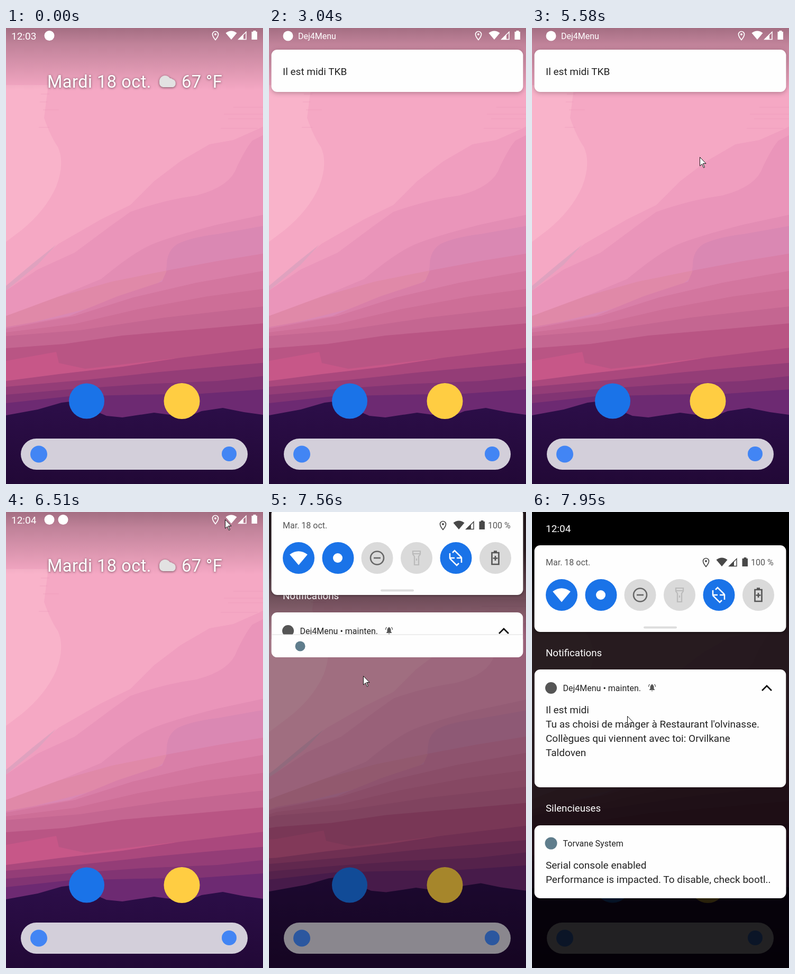
An HTML page that plays this animation: 486x863 px, repeating every 8000 ms.

```html
<!DOCTYPE html>
<html lang="fr">
<head>
<meta charset="utf-8">
<title>Notification de midi</title>
<style>
html, body { margin: 0; height: 100%; overflow: hidden; background: #000; }
svg { display: block; font: 19px Roboto, sans-serif; }
#date { font-size: 32.5px; letter-spacing: .5px; fill: #fff; filter: drop-shadow(0 1px 2px #0008); }
#headsUp { filter: drop-shadow(0 2px 5px #0004); }
.small { font-size: 16px; }
.section { font-size: 18.7px; }
</style>
</head>
<body>
<svg id="stage" width="486" height="863" viewBox="0 0 486 863">
<defs>
  <linearGradient id="scrim" x2="0" y2="1">
    <stop stop-color="#201018" stop-opacity=".38"/>
    <stop offset=".25" stop-color="#201018" stop-opacity=".25"/>
    <stop offset="1" stop-color="#201018" stop-opacity="0"/>
  </linearGradient>
  <linearGradient id="night" x2="0" y2="1">
    <stop stop-color="#2c0e49"/><stop offset=".75" stop-color="#210835"/>
  </linearGradient>
  <linearGradient id="header" x2="0" y2="1">
    <stop offset=".3"/><stop offset="1" stop-opacity="0"/>
  </linearGradient>
  <path id="wifi" d="M0 16-10.5 3.5Q0-4.5 10.5 3.5Z"/>
  <g id="system" fill="currentColor">
    <path d="M396 22.5C394 20 390.5 16 390.5 12a5.5 5.5 0 0 1 11 0C401.500 16 398 20 396 22.500Z" fill="none" stroke="currentColor" stroke-width="1.700"/>
    <circle cx="396" cy="12" r="2"/>
    <use href="#wifi" x="426" y="6"/>
    <path d="M454 7.500V21.500H440Z" fill="none" stroke="currentColor" stroke-width="1.500"/>
    <path d="M449 11.500V22H438.500Z"/>
    <path d="M464.500 7h3V5h5v2h2.500v15h-10.500z"/>
  </g>
</defs>

<g id="wallpaper">
  <path fill="#f5a8c4" d="M-40-40H530V930H-40Z"/>
  <path fill="#f9b3ca" d="M-40 108H80L72 170Q84 205 98 225Q112 255 95 300Q75 345 30 382L-40 435Z"/>
  <path fill="#f09ebf" d="M-40 520 0 490 50 448 100 408 180 362 235 335 280 290 330 252 385 220 430 212 475 192 530 165V930H-40Z"/>
  <path fill="#dfa2bf" d="M-40 518 0 488 50 446 95 410 60 448 0 497-40 525Z"/>
  <path fill="#ea95ba" d="M-40 522 0 497 60 457 130 425 200 373 235 348Q300 325 360 317Q425 300 437 262Q455 225 466 213L530 180V930H-40Z"/>
  <path fill="#e38db4" d="M-40 560 0 545 60 525 120 500 180 475Q240 425 275 410T400 372L530 344V930H-40Z"/>
  <path fill="#da88b3" d="M-40 570 120 536 210 508Q260 495 285 484Q304 474 304 445Q306 420 324 409Q350 396 400 390L530 367V930H-40Z"/>
  <path fill="#e089a8" d="M-40 562 0 545 100 508 200 480 304 459Q303 474 285 484Q250 500 150 532L-40 580Z"/>
  <path fill="#d97fa8" d="M-40 582 0 566 120 545 210 508 295 480 304 459 400 441 530 420V930H-40Z"/>
  <path fill="#d3769f" d="M-40 580 0 569 130 545 240 510 360 482 530 452V930H-40Z"/>
  <path fill="#cd6e97" d="M-40 588 0 576 130 560 250 532 380 508 530 488V930H-40Z"/>
  <path fill="#c46691" d="M-40 592 0 583 140 572 300 548 530 522V930H-40Z"/>
  <path fill="#b95584" d="M-40 612 0 606 110 598 220 582 350 571 530 555V930H-40Z"/>
  <path fill="#c75788" d="M-40 634 0 630 95 613 100 634 150 645 320 625 290 638 150 655-40 675Z"/>
  <path fill="#aa487d" d="M-40 670 0 668 100 655 220 641 330 624 530 600V930H-40Z"/>
  <path fill="#943d77" d="M-40 682 0 679 150 666 290 651 400 641 530 630V930H-40Z"/>
  <path fill="#823473" d="M-40 698 0 694 130 683 260 674 400 668 530 654V930H-40Z"/>
  <path fill="#6d2a72" d="M-40 714 0 710 120 697 250 694 370 692 530 681V930H-40Z"/>
  <path fill="url(#night)" d="M-40 740 0 733 60 722 105 709 130 706 160 721 190 734 220 737 280 728 310 732 340 737 370 725 410 719 450 727 530 738V930H-40Z"/>
  <path stroke="#e895b7" opacity=".5" d="M430 150h80M412 163h90M420 172h70M406 190h70M62 188h20M66 125h16M70 155h30M64 140h14"/>
</g>
<path fill="url(#scrim)" d="M0 0H486V118H0Z"/>

<circle cx="152.500" cy="706" r="33.500" fill="#1a73e8"/>
<circle cx="332.500" cy="706" r="34" fill="#ffcd42"/>
<rect x="28" y="777" width="429" height="59" rx="29.500" fill="#d3cfda"/>
<circle cx="62" cy="806.500" r="16" fill="#4285f4"/>
<circle cx="422" cy="806" r="14" fill="#4285f4"/>

<g id="date">
  <text x="78" y="113">Mardi 18 oct.</text>
  <path fill="#e2e2e2" d="M297 112a8 8 0 0 1-7-9A11 11 0 0 1 310 95a7 7 0 0 1 5 2a8 8 0 0 1 1 15Z"/>
  <text x="332" y="113">67 °F</text>
</g>

<g id="status" fill="#fff" color="#fff">
  <g id="clock">
    <text id="time" x="10" y="21.500">12:03</text>
    <circle cx="82" cy="14.500" r="9.500"/>
    <circle id="extra" cx="108" cy="14.500" r="9.500"/>
  </g>
  <g id="app"><circle cx="36" cy="15" r="9.500"/><text class="small" x="55" y="20.500">Dej4Menu</text></g>
  <use href="#system"/>
</g>

<g id="headsUp">
  <rect x="4.500" y="41" width="476" height="80" rx="11" fill="#fefefe"/>
  <text x="26" y="89" fill="#222">Il est midi TKB</text>
</g>

<rect id="dim" width="486" height="863"/>
<g id="shade">
  <path id="top" fill="url(#header)" d="M0 0H486V235H0Z"/>
  <text id="label" class="section" x="26" fill="#fff">Notifications</text>
  <svg id="card" x="4.500" width="476" height="223">
    <rect width="476" height="100%" rx="11" fill="#fefefe"/>
    <g transform="translate(-4.500 -298)" fill="#222">
      <circle cx="36" cy="333" r="11" fill="#555"/>
      <text class="small" x="58.500" y="338.500">Dej4Menu • mainten.</text>
      <path fill="#555" d="M222 337v-1l1.500-1.500V331q0-3 2.500-4v-1h2v1q2.500 1 2.500 4v3.500L232 336v1ZM225.500 338h3q-1.500 2.500-3 0Z"/>
      <path d="M220.500 331q0-3 2-5M233.500 331q0-3-2-5" fill="none" stroke="#555" stroke-width="1.300"/>
      <path d="M435 338 444 329 453 338" fill="none" stroke="#111" stroke-width="2.800"/>
      <text x="26" y="381">Il est midi</text>
      <text x="26" y="407.500">Tu as choisi de manger à Restaurant l'olvinasse.</text>
      <text x="26" y="434.500">Collègues qui viennent avec toi: Orvilkane</text>
      <text x="26" y="461.500">Taldoven</text>
    </g>
    <g id="shelf">
      <rect width="476" height="43" rx="11" fill="#fefefe"/>
      <path d="M0 0H476" stroke="#ddd"/>
      <circle id="shelfApp" cx="58.500" cy="22" r="9.500" fill="#555"/>
      <circle id="shelfSystem" cy="22" r="9.500" fill="#5f7d8c"/>
    </g>
  </svg>

  <g id="silent" fill="#222">
    <text class="section" x="26" y="567" fill="#fff">Silencieuses</text>
    <rect x="4.500" y="593" width="476" height="138" rx="11" fill="#fefefe"/>
    <circle cx="36" cy="627" r="11.500" fill="#5f7d8c"/>
    <text class="small" x="58.500" y="632.500">Torvane System</text>
    <text x="26" y="675">Serial console enabled</text>
    <text x="26" y="701.500">Performance is impacted. To disable, check bootl..</text>
  </g>

  <g id="panel">
    <text x="26" y="38" fill="#fff">12:04</text>
    <rect x="4.500" y="63" width="476" height="164" rx="11" fill="#fefefe" style="filter:drop-shadow(0 1px 2px #0006)"/>
    <g class="small" fill="#555"><text x="26" y="101">Mar. 18 oct.</text><text x="414" y="101">100 %</text></g>
    <use href="#system" x="-67" y="81" color="#484848"/>
    <g id="toggles"></g>
    <use href="#wifi" transform="translate(56 145) scale(1.600)" fill="#fff"/>
    <circle cx="130" cy="157" r="9" fill="#fff"/>
    <g fill="none" stroke="#666" stroke-width="2.600">
      <circle cx="204.500" cy="157" r="12.500"/><path d="M198 157h13"/>
      <path stroke="#bbb" stroke-width="2.200" d="M272 144h14v6l-3 4v16h-8v-16l-3-4ZM272 149h14M279 158v4"/>
      <path stroke="#fff" stroke-width="2.500" d="M347 147l4-4 13 13M359 167l-4 4-13-13M342 148v9h9M364 166v-9h-9"/>
      <path stroke="#555" d="M421.500 147h13v22h-13ZM428 153v9M423.500 157.500h9M425 144.500h6"/>
    </g>
    <rect x="211" y="216.500" width="63" height="4" rx="2" fill="#ddd"/>
  </g>
</g>
<path id="cursor" fill="#fff" stroke="#111" d="M.5.5V17L4.500 13.500 7.500 20.500 9.500 19.500 6.500 12.500H12Z"/>
</svg>

<script>
const $ = id => document.getElementById(id);
const set = (id, attrs) => { for (const k in attrs) $(id).setAttribute(k, attrs[k]); };

[56, 130.5, 204.5, 279, 353.5, 428].forEach((x, i) => {
  const on = [0, 1, 4].includes(i);
  $('toggles').innerHTML += `<circle cx="${x}" cy="157" r="30" fill="${on ? '#1a73e8' : '#dadada'}"/>`;
});

// Each row holds from its time until the next one.
const pointer = [ // time, x, y
  [0, -50, 0], [3040, 243, 861], [3190, 237, 846], [3310, 234, 834], [3590, 234, 833],
  [3710, 234, 831], [3960, 244, 833], [4110, 271, 842], [4260, 274, 843], [4380, 275, 842],
  [4530, 271, 838], [4650, 273, 835], [4800, 269, 715], [4920, 279, 490], [5040, 306, 299],
  [5190, 313, 255], [5310, 313, 243], [5460, 316, 246], [5580, 317, 244], [5730, 335, 213],
  [5850, 362, 165], [5970, 379, 143], [6120, 386, 100], [6240, 402, 50], [6390, 412, 24],
  [6510, 414, 14], [6660, 380, 56], [6780, 310, 38], [6900, 250, 18], [7020, 210, 6],
  [7290, 195, 75], [7440, 180, 205], [7560, 178, 310], [7710, 178, 387], [7830, 179, 387], [7950, 180, 386]
];
const popup = [ // time, offset, opacity
  [0, 0, 0], [650, -75, .4], [770, -35, .8], [890, -6, 1], [1040, 0, 1], [6120, -30, 1], [6240, 0, 0]
];
const dateFade = [[0, 1], [650, .5], [770, 0], [6390, .5], [6510, 1]];
const pull = [ // time, wallpaper zoom, panel offset, card top, card bottom, dimming, header, silent section
  [0, 1, -240, 0, 0, 0, 0, 0],
  [7290, .985, -215, 13, 45, 0, 0, 0],
  [7440, .953, -194, 33, 72, 0, .3, 0],
  [7560, .943, -70, 190, 275, .35, .7, 0],
  [7710, .934, 0, 298, 417, .65, 1, 0],
  [7830, .925, 0, 298, 480, .76, 1, .6],
  [7950, .92, 0, 298, 521, .84, 1, 1]
];
const at = (rows, t) => rows.findLast(r => r[0] <= t).slice(1);

function draw(t) {
  const [x, y] = at(pointer, t), [drop, alpha] = at(popup, t);
  const [zoom, panelY, top, bottom, dim, header, silent] = at(pull, t);
  const named = t >= 650 && t < 6240, open = t >= 7290, height = bottom - top;

  set('cursor', { transform: `translate(${x} ${y})` });
  set('headsUp', { transform: `translate(0 ${drop})`, opacity: alpha });
  set('date', { opacity: at(dateFade, t)[0] });
  set('clock', { opacity: +(t < 500 || t >= 6240) });
  set('app', { opacity: +named });
  set('extra', { opacity: +(t >= 6240) });
  $('time').textContent = t < 500 ? '12:03' : '12:04';
  set('status', { opacity: +(t < 7440) });

  set('wallpaper', { transform: `translate(243 431.5) scale(${zoom}) translate(-243 -431.5)` });
  set('dim', { opacity: dim });
  set('shade', { visibility: open ? 'visible' : 'hidden' });
  set('top', { opacity: header });
  set('label', { y: top - 25 });
  set('card', { y: top, height });
  set('shelf', { transform: `translate(0 ${height - 43})`, opacity: +(t < 7830) });
  set('shelfApp', { opacity: +(t < 7560) });
  set('shelfSystem', { cx: t < 7560 ? 88.5 : 54.5 });
  set('silent', { opacity: silent });
  set('panel', { transform: `translate(0 ${panelY})` });
}

function tick() {
  draw(performance.now() % 8000);
  requestAnimationFrame(tick);
}
tick();
</script>
</body>
</html>
```
